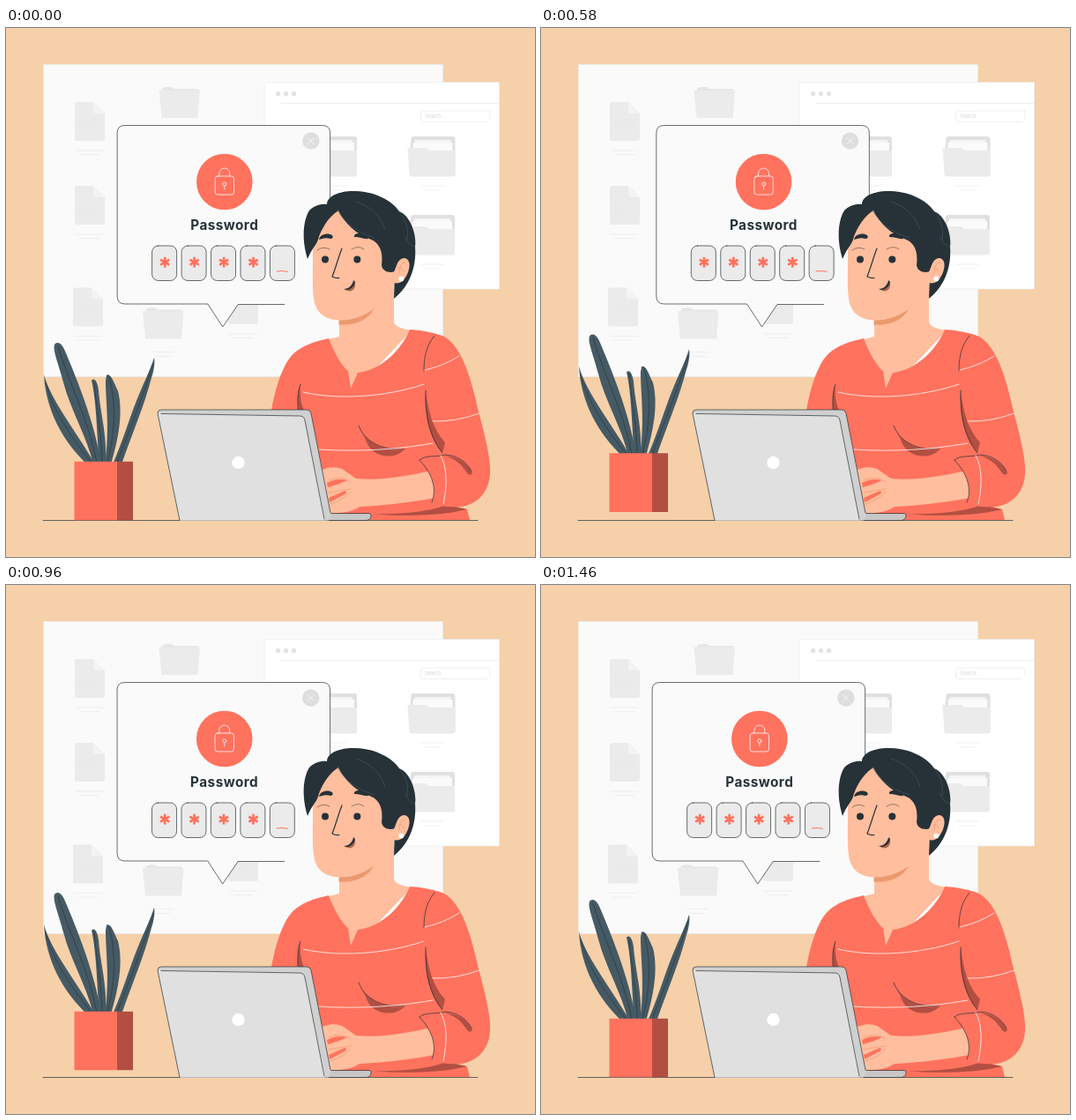
Recreate the animation shown at these times as an HTML page. Size 600 by 600 pixels, loop 1500 ms.

```html
<!DOCTYPE html>
<html lang="en">
<head>
<meta charset="utf-8">
<title>Password</title>
<style>
  html, body { margin: 0; width: 100%; height: 100%; overflow: hidden; background: #f6d0a9; }
  svg { display: block; width: 100%; height: 100%; }
  .coral { fill: #ff725e; }
  .shade { fill: #b24f42; }
  .skin { fill: #ffbe9d; }
  .dark { fill: #263238; }
  .leaf { fill: #455a64; }
  .pale { fill: #ebebeb; }
  .line { fill: none; stroke: #263238; stroke-width: .7; stroke-linecap: round; stroke-linejoin: round; }
  .white { fill: none; stroke: #fafafa; stroke-width: .8; stroke-linecap: round; }
  .faint { fill: none; stroke: #ebebeb; stroke-width: .8; }
</style>
</head>
<body>
<svg viewBox="0 0 600 600">
  <defs>
    <g id="doc">
      <path class="pale" d="M3 0H21L34 13V41Q34 44 31 44H3Q0 44 0 41V3Q0 0 3 0Z"/>
      <path d="M21 0L34 13H24Q21 13 21 10Z" fill="#f3f3f3"/>
      <path d="M4 20H29M4 25H29M4 30H24" stroke="#e6e6e6" stroke-width=".5"/>
      <path class="faint" d="M1 55H33M6 59.5H28"/>
    </g>
    <g id="folder">
      <path d="M3 5L4 1Q9-1 15 0L17 2H44L45 7H3Z" fill="#e6e6e6"/>
      <path class="pale" d="M0 3.5H46.500L44 35H3Z"/>
      <path class="faint" d="M9 50H35M13 55H31"/>
    </g>
    <g id="files">
      <path d="M6 0H50Q53 0 53 3V44H2V13L3 3Q3 0 6 0Z" fill="#e0e0e0"/>
      <path d="M7 4H48V12H7Z" fill="#f5f5f5"/>
      <path d="M5 7H50V16H5Z" fill="#fafafa"/>
      <path class="pale" d="M-1 13H20L24 16H53V43Q53 45.500 50 45.500H4Q1 45.500 1 43Z"/>
      <path class="faint" d="M14 56H41M19 61H36"/>
    </g>
  </defs>

  <rect width="600" height="600" fill="#f6d0a9"/>
  <rect x="42.500" y="41.500" width="453" height="354" fill="#fafafa" stroke="#ebebeb" stroke-width=".7"/>
  <use href="#doc" x="78" y="84"/>
  <use href="#doc" x="78" y="179"/>
  <use href="#doc" x="76" y="294.500"/>
  <use href="#doc" x="252" y="292"/>
  <use href="#folder" x="173.500" y="67"/>
  <use href="#folder" x="155" y="317.500"/>

  <rect x="293" y="61.700" width="266.500" height="234.300" fill="#fff" stroke="#ebebeb" stroke-width=".7"/>
  <g fill="#e4e4e4">
    <circle cx="308.500" cy="74.500" r="2.700"/><circle cx="317.500" cy="74.500" r="2.700"/><circle cx="326.500" cy="74.500" r="2.700"/>
  </g>
  <path class="faint" d="M312 85.500H559M549 104V94H473Q470.500 94 470.500 96.500V104Q470.500 106.500 473 106.500H546"/>
  <text x="475" y="102" font-family="Inter, sans-serif" font-size="5.500" fill="#d4d4d4">Search...</text>
  <use href="#files" x="345" y="123"/>
  <use href="#files" x="456.500" y="123"/>
  <use href="#files" x="456" y="212"/>

  <g id="bubble">
    <path fill="#fafafa" d="M135 110.500H359Q367.800 110.500 367.800 119V313H263L246 339L229 313H135Q126.300 313 126.300 304V119Q126.300 110.500 135 110.500Z"/>
    <path class="line" d="M367.800 205V119Q367.800 110.500 359 110.500H135Q126.300 110.500 126.300 119V304Q126.300 313 135 313H229L246 339L263.500 313.500H316"/>
    <circle cx="346" cy="128" r="9.700" fill="#dedede"/>
    <path class="white" d="M342.500 124.500L349.500 131.500M349.500 124.500L342.500 131.500"/>
    <circle class="coral" cx="248" cy="174.500" r="31.800"/>
    <rect class="white" x="237.300" y="168" width="21.400" height="21" rx="3"/>
    <path class="white" d="M242 168V165A6 6 0 0 1 254 165V168M248 179V183"/>
    <circle class="white" cx="248" cy="177" r="2"/>
    <text class="dark" x="247.900" y="229" text-anchor="middle" font-family="Inter, sans-serif" font-weight="700" font-size="15.300" letter-spacing=".45">Password</text>
    <g id="keys"></g>
    <path d="M307 276Q313 275 320 276.300" fill="none" stroke="#ff725e"/>
  </g>

  <!-- head and neck -->
  <path class="skin" d="M372 203C354 222 347 240 348 262C348 282 347 300 350 312C354 326 365 331 378 331.500V350L366 353L392 415L460 343C449 341 441 339 440 333V270L425 232Z"/>
  <path d="M377.500 331.500C392 332 405 327 417 319C410 332 394 338 377.500 336.500Z" fill="#eb996e"/>
  <path class="dark" d="M342 262C335 240 337 218 344 207C350 201 358 199 364 200C364 190 380 184 397 185C420 186 438 196 446 208C459 213 466 235 464 248C466 275 455 295 440 307L441 276C436 278 427 277 426 269C428 252 423 243 412 239C396 233 384 221 377 207C364 215 356 232 354 240C352 246 347 250 342 262Z"/>
  <path d="M376 206C382 219 396 231 418 238M397 197C413 202 425 213 430 229M446 208C453 217 457 227 455 240M464 248C459 247 455 243 452 236" fill="none" stroke="#455a64" stroke-width=".6"/>
  <path class="skin" d="M440 277C443 270 444 262 451 261C458 261 459 269 456 277C453 285 448 291 440 289Z"/>
  <path class="line" d="M453 266C448 266 446 271 446 278M446 272Q450 271 451 276" style="stroke:#eb996e"/>
  <circle cx="448.300" cy="284.500" r="3" fill="#fff"/>
  <circle class="dark" cx="362" cy="262.500" r="4"/>
  <circle class="dark" cx="398.300" cy="262.500" r="4"/>
  <path class="dark" d="M355 240C356 233 366 232 370 235Q372 239 368 239C362 237 359 239 355 240ZM395 237C394 232 406 231 411 239C406 240 402 237 395 237Z"/>
  <path class="line" d="M353 252Q360 247 367 251M392 251Q400 246 406 251" style="stroke-width:.5"/>
  <path class="line" d="M381 250C377 260 374 272 370 282Q374 284 378 283.500" style="stroke-width:1.200"/>
  <path d="M385 297C390 296 391 290 396 289C397 296 392 301 385 297Z" fill="#b4664a"/>
  <path class="dark" d="M383 296C389 296 393 292 394 286L396 288C395 294 389 299 383 296Z"/>

  <!-- shirt -->
  <path class="coral" d="M366 352C372 368 381 384 388 389L391 409L399 391C425 388 448 366 458 342C474 343 488 346 497 350C518 362 528 400 536 435C544 465 550 490 549 505C548 530 530 543 512 543L523 546L526 558H365L301 434C304 415 310 395 316 384C325 365 340 358 366 352Z"/>
  <path class="shade" d="M334 404C330 416 331 425 331 434H338C334 425 333 415 334 404ZM476 411C474 440 480 465 495 482L498 470C484 455 479 435 476 411ZM400 451C407 469 426 480 451 479C440 490 414 488 408 467ZM414 551C445 552 480 549 499 541L523 546C500 552 455 555 414 551Z"/>
  <path class="line" d="M486 349C476 361 474 375 474 389M400 451C406 467 422 479 452 478M476 411C475 440 481 465 495 482M334 404C330 414 331 425 331 432"/>
  <path class="white" d="M337 413C375 422 430 419 474 404M475 388Q497 383 514 372M484 446Q510 447 537 437M355 478C400 481 445 478 484 471"/>

  <!-- forearm and sleeve -->
  <path class="skin" d="M355 503C365 497 378 497 384 502L397 511C425 514 455 508 487 501V533C460 538 425 542 401 543C392 549 380 551 366 550Z"/>
  <path class="coral" d="M364 516Q375 510 387 513L378 517L365 521ZM366 533L384 525Q388 526 384 529L367 538Z"/>
  <path class="line" d="M366 513Q381 507 391 515M366 527Q380 524 391 523M368 540Q382 536 391 526" style="stroke:#eb996e"/>
  <path class="coral" d="M469 490C477 483 488 487 498 484C518 482 535 483 547 487C554 522 533 544 510 543C499 544 489 541 483 538C489 523 484 506 469 490Z"/>
  <path class="shade" d="M497 485C511 486 523 492 529 505C527 508 524 507 521 502C515 493 508 488 497 485Z"/>
  <path class="line" d="M469 490C475 484 489 487 498 484C512 485 523 492 528 503M469 490C484 506 489 523 483 538"/>
  <path class="white" d="M493 485C500 497 501 517 496 540"/>

  <!-- desk and laptop -->
  <path class="line" d="M42 558.500H535"/>
  <path d="M364 551H414V554Q413 558.500 408 558.500H364Z" fill="#c7c7c7"/>
  <path class="line" d="M366 550.500H412Q415 551 414 554Q413 558.500 408 558.500H365"/>
  <path d="M172 437Q172 433 176 433H341Q345 433 346 437L369 553L366 558.500H197Z" fill="#d0d0d0"/>
  <path d="M172 437L333 440Q338 440 339 445L362 558.500H197Z" fill="#e0e0e0"/>
  <path class="line" d="M197 558.500L172 437Q172 433 176 433H341Q345 433 346 437L368 550M176 437.500L333 440Q338 440 339 445L361 557"/>
  <circle cx="263.500" cy="493" r="7.200" fill="#fff"/>

  <g id="plant">
    <path class="leaf" d="M43 393C45 402 51 414 57 425C69 446 88 472 101 495H92C65 470 45 434 43 393Z"/>
    <path class="leaf" d="M56 358C61 355 65 361 68 369C80 398 101 448 108 495H99C92 464 73 433 65 402C60 382 51 362 56 358Z"/>
    <path class="leaf" d="M97 400C101 396 104 403 105 411C107 438 115 462 113 495H106C103 465 103 425 97 400Z"/>
    <path class="leaf" d="M114 394C119 391 122 402 127 412C133 436 128 465 119 495H112C118 455 113 425 113 400Z"/>
    <path class="leaf" d="M168 374C169 380 168 388 165 397C157 428 144 458 131 495H121C132 470 140 443 148 423C155 405 163 390 168 374Z"/>
    <path class="line" d="M45 402C52 432 74 465 97 493M59 361C70 400 94 445 103 493M100 402C103 435 109 465 109 493M117 396C126 430 123 462 115 493M167 381C158 410 144 447 126 493" style="stroke-width:.6"/>
    <path class="coral" d="M77.500 492H126.500V558.700H77.500Z"/>
    <path class="shade" d="M126 492H144V558.700H126Z"/>
  </g>
</svg>
<script>
  const LOOP = 1500, FRAMES = 36, STEP = LOOP / FRAMES;
  const SHAKE = [0, -1, 2, -4, 4, -4, 4, -4, 2, -1, 0];
  const UNIT = 1.2;
  const el = id => document.getElementById(id);

  const star = x => [0, 60, 120].map(a =>
    `<path d="M${x} 259.800V271.600" transform="rotate(${a} ${x} 265.700)" stroke="#ff725e" stroke-width="2.700"/>`).join('');
  el('keys').innerHTML = [0, 1, 2, 3, 4].map(i => {
    const x = 165.8 + i * 33.45;
    return `<rect class="line" style="fill:#ebebeb" x="${x}" y="247" width="28" height="39.500" rx="7"/>` +
      (i < 4 ? star(x + 14.6) : '');
  }).join('');

  function shake(p) {
    const i = Math.floor(p * 10);
    return SHAKE[i] + (SHAKE[i + 1] - SHAKE[i]) * (p * 10 - i);
  }

  // The motion runs at 24 steps a second, each posed at its middle.
  function draw(now) {
    const step = Math.floor((now % LOOP + 5) / STEP) % FRAMES;
    const p = (step + .5) / FRAMES;
    const lift = 10 * (1 - Math.abs(1 - 2 * p));
    el('bubble').setAttribute('transform', `translate(${UNIT * shake(p)} 0)`);
    el('plant').setAttribute('transform', `translate(0 ${-UNIT * lift})`);
    requestAnimationFrame(draw);
  }
  draw(performance.now());
</script>
</body>
</html>
```
